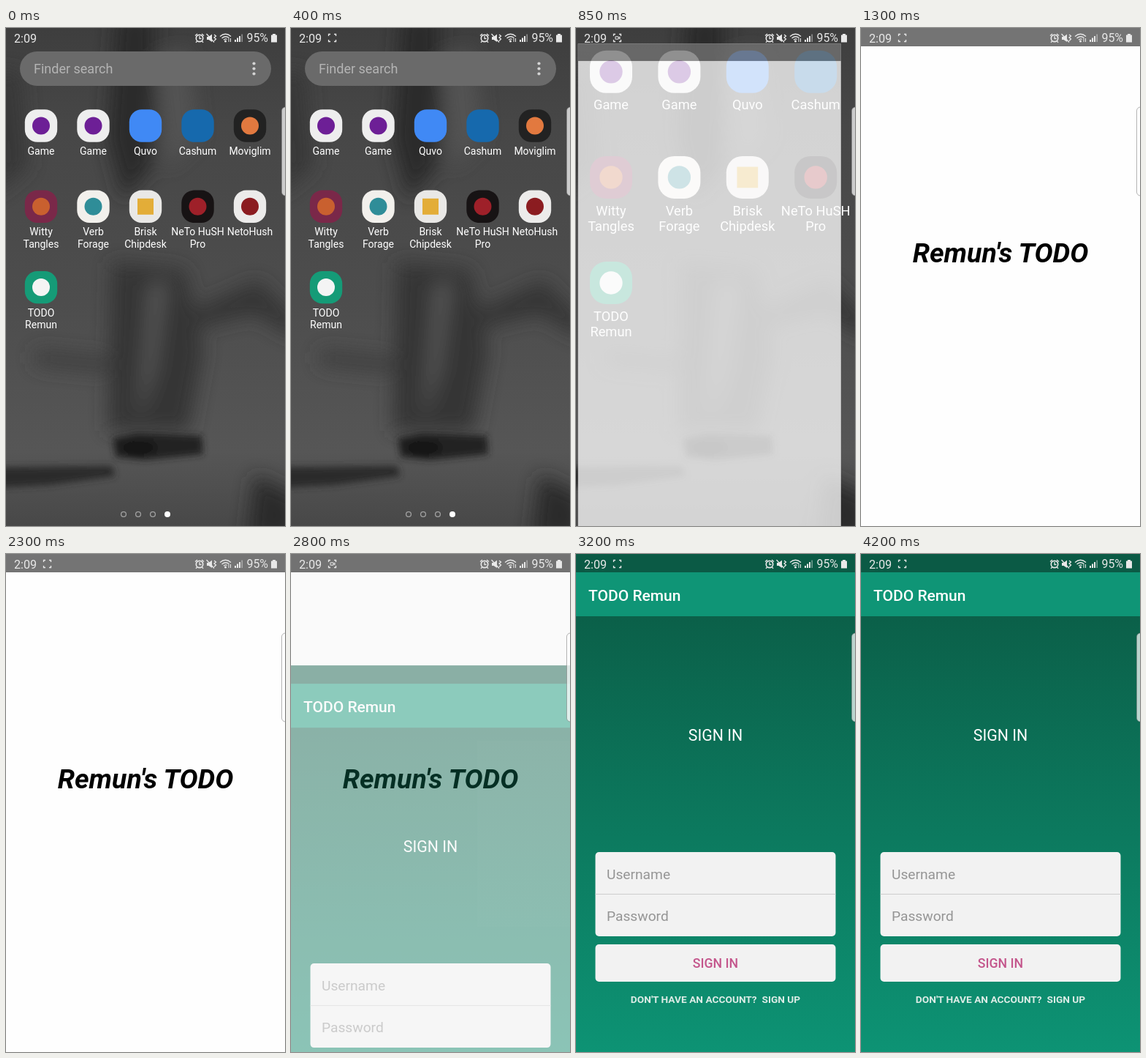
An HTML page for the animation above (4750 ms loop, 382 by 680 pixels).

```html
<!DOCTYPE html>
<html lang="en">
<head>
<meta charset="utf-8">
<title>Todo app launch</title>
<style>
  html, body { margin: 0; width: 100%; height: 100%; overflow: hidden; background: #444; }
  svg { display: block; width: 100%; height: 100%; }
  text { font-family: Roboto, "Noto Sans", sans-serif; white-space: pre; }
  .mid { text-anchor: middle; }
</style>
</head>
<body>
<svg viewBox="0 0 382 680" preserveAspectRatio="xMidYMid meet">
  <defs>
    <linearGradient id="wall" x1="0" y1="0" x2="0" y2="1">
      <stop offset="0" stop-color="#3e3e3e"/>
      <stop offset=".2" stop-color="#474747"/>
      <stop offset=".55" stop-color="#4d4d4d"/>
      <stop offset=".85" stop-color="#565656"/>
      <stop offset="1" stop-color="#484848"/>
    </linearGradient>
    <linearGradient id="green" x1="0" y1="0" x2="0" y2="1">
      <stop offset="0" stop-color="#0b6049"/>
      <stop offset="1" stop-color="#0d9374"/>
    </linearGradient>
    <filter id="soft" x="-30%" y="-30%" width="160%" height="160%"><feGaussianBlur stdDeviation="13"/></filter>
    <filter id="blur" x="-30%" y="-60%" width="160%" height="220%"><feGaussianBlur stdDeviation="5"/></filter>
  </defs>

  <g id="wallpaper">
    <rect width="382" height="680" fill="url(#wall)"/>
    <g filter="url(#soft)">
      <path d="M150-20H205L200 190L160 235L138 150Z" fill="#2c2c2c"/>
      <path d="M-20 60H20L30 190L-20 230Z" fill="#383838"/>
      <path d="M205 40L250 30L262 150L220 190Z" fill="#535353"/>
      <path d="M145 320L245 330L270 440L250 550H140Z" fill="#343434"/>
      <path d="M195 350L222 345L205 470L180 540Z" fill="#535353"/>
      <path d="M255 385L345 345L400 400V425L340 390L260 410Z" fill="#353535"/>
      <path d="M40 440L140 450V470L40 460Z" fill="#3c3c3c"/>
      <path d="M340 610L400 640V700H330Z" fill="#2a2a2a"/>
    </g>
    <g filter="url(#blur)">
      <path d="M146 560L180 553L268 557L270 582L190 590L150 586Z" fill="#242424"/>
      <path d="M-15 600L145 598L150 612L60 624L-15 628Z" fill="#2b2b2b"/>
      <ellipse cx="181" cy="573" rx="25" ry="12" fill="#191919"/>
    </g>
  </g>

  <g id="home">
    <rect x="19" y="32" width="344" height="47" rx="23.5" fill="#6a6a6a"/>
    <text x="38" y="62" font-size="18" fill="#b4b4b4">Finder search</text>
    <g fill="#d4d4d4">
      <circle cx="339.5" cy="48.5" r="2.1"/>
      <circle cx="339.5" cy="55.5" r="2.1"/>
      <circle cx="339.5" cy="62.5" r="2.1"/>
    </g>
    <g id="apps"></g>
    <g fill="none" stroke="#a2a2a2" stroke-width="1.3">
      <circle cx="161" cy="664" r="3.4"/>
      <circle cx="181" cy="664" r="3.4"/>
      <circle cx="201" cy="664" r="3.4"/>
      <circle cx="221" cy="664" r="4" fill="#fff" stroke="none"/>
    </g>
  </g>

  <g id="splash">
    <rect width="382" height="700" fill="#fefefe"/>
    <rect width="382" height="25" fill="#747474"/>
    <text id="heading" class="mid" x="191" y="320" font-size="37.5" font-weight="700" font-style="italic">Remun's TODO</text>
  </g>
  <rect id="dim" width="382" height="680"/>

  <g id="login">
    <rect y="84" width="382" height="596" fill="url(#green)"/>
    <rect width="382" height="26" fill="#0b5a45"/>
    <rect y="25" width="382" height="60" fill="#0f9576"/>
    <text x="17" y="63.5" font-size="21" font-weight="500" fill="#fff">TODO Remun</text>
    <text class="mid" x="191" y="254.5" font-size="21.3" fill="#fff">SIGN IN</text>
    <rect x="26.5" y="407" width="329" height="115" rx="5" fill="#f2f2f2"/>
    <path d="M26.5 464.5H355.5" stroke="#cdcdcd"/>
    <g font-size="19.2" fill="#959595">
      <text x="42" y="443.5">Username</text>
      <text x="42" y="501">Password</text>
    </g>
    <rect x="26.5" y="533" width="329" height="51" rx="5" fill="#f2f2f2"/>
    <text class="mid" x="191" y="565" font-size="17.7" font-weight="500" fill="#c4568c">SIGN IN</text>
    <text class="mid" x="191" y="612.5" font-size="13.7" font-weight="700" fill="#dcece6">DON'T HAVE AN ACCOUNT?  SIGN UP</text>
  </g>

  <rect x="377.5" y="108" width="14" height="121" rx="5" fill="#fff" fill-opacity=".72" stroke="#777" stroke-opacity=".55"/>

  <g id="status" fill="#e8e8e8">
    <text x="11" y="19.5" font-size="16.2">2:09</text>
    <text x="329.5" y="19.3" font-size="15.9">95%</text>
    <g fill="none" stroke="#e8e8e8" stroke-width="1.3">
      <g id="rec">
        <path d="M51.5 11V8.5H54M59 8.5H61.5V11M61.5 16V18.5H59M54 18.5H51.5V16"/>
        <path id="cam" d="M54 11.8H58V15.2H54ZM58 13.5L60 12V15Z" stroke-width="1"/>
      </g>
      <circle cx="265" cy="14" r="4.7" stroke-width="1.7"/>
      <path d="M265 11V14.5H267.5M259 10.5L262 8M271 10.5L268 8M261.5 18L260 19.8M268.5 18L270 19.8"/>
      <path d="M274.5 8L285 19.5M285 9L287.5 11L285 13L287.5 15L285 17.5"/>
      <path d="M293 11.5Q300.5 5 308 11.5M295.5 14Q300.5 9.7 305.5 13.5M298 16.3Q300.5 14 302.5 15.5"/>
      <path d="M305 14V19M307.5 19V14" stroke-width="1"/>
    </g>
    <path d="M275 12H277.5L282 8.5V19L277.5 16H275Z"/>
    <circle cx="300.5" cy="18" r="1.5"/>
    <path d="M313 16H315V19H313ZM316 13.5H318V19H316ZM319 11H321V19H319Z"/>
    <path d="M322.3 8.5H324V19H322.3Z" opacity=".45"/>
    <path d="M363 9.5H365V8H369V9.5H371V19.5H363Z"/>
  </g>
</svg>
<script>
const LOOP = 4750, STEP = 50;
const el = id => document.getElementById(id);
const clamp = v => Math.max(0, Math.min(1, v));
const span = (t, a, b) => clamp((t - a) / (b - a));

// label, tile colour, mark colour, square mark
const apps = [
  ["Game", "#eeeeee", "#6d1f96"],
  ["Game", "#eeeeee", "#6d1f96"],
  ["Quvo", "#4089f5"],
  ["Cashum", "#1669ad"],
  ["Moviglim", "#222222", "#e2793f"],
  ["Witty\nTangles", "#7a2849", "#c9602f"],
  ["Verb\nForage", "#f2f0ec", "#2f8d98"],
  ["Brisk\nChipdesk", "#e9e8e6", "#e3ad38", true],
  ["NeTo HuSH\nPro", "#171314", "#9e2029"],
  ["NetoHush", "#ecebea", "#8b1c20"],
  ["TODO\nRemun", "#159b77", "#f4f4f4"]
];

function icon([label, tile, mark, square], i) {
  const x = 48 + (i % 5) * 71.5, y = 133.5 + Math.floor(i / 5) * 110.3;
  const shape = !mark ? "" : square
    ? `<rect x="${x - 11}" y="${y - 11}" width="22" height="22" fill="${mark}"/>`
    : `<circle cx="${x}" cy="${y}" r="12" fill="${mark}"/>`;
  const lines = label.split("\n").map((s, n) =>
    `<text class="mid" x="${x}" y="${y + 39.5 + n * 16.2}" font-size="14" fill="#fff">${s}</text>`);
  return `<rect x="${x - 22.2}" y="${y - 22.2}" width="44.4" height="44.4" rx="17" fill="${tile}"/>`
    + shape + lines.join("");
}
el("apps").innerHTML = apps.map(icon).join("");

const set = (id, attrs) => {
  for (const k in attrs) el(id).setAttribute(k, attrs[k]);
};
const show = (id, on) => set(id, { display: on ? "inline" : "none" });
const grow = s => `translate(48 374) scale(${s}) translate(-48 -374)`;

// recorder icon blink: on from a to b
const blinks = [[800, 1250], [1700, 2300], [2700, 3200], [3700, 4200]];

function draw(t) {
  // launch: launcher and new window both grow from the tapped icon
  const open = 1 - (1 - span(t, 750, 950)) ** 3;
  const covered = t >= 950;
  show("wallpaper", !covered);
  show("home", !covered);
  set("home", { transform: grow(1 + 0.35 * open) });

  const lift = -10 * span(t, 2800, 2950);
  show("splash", t > 750 && t < 3200);
  set("splash", {
    transform: covered ? `translate(0 ${lift})` : grow(0.54 + 0.46 * open),
    opacity: span(t, 750, 880)
  });
  show("heading", t >= 1150);

  // login slides up over the splash
  set("dim", { opacity: t < 3200 ? 0.14 * span(t, 2780, 2950) : 0 });
  show("login", t > 2700);
  set("login", {
    transform: `translate(0 ${352 * (1 - span(t, 2700, 3200)) ** 3.76})`,
    opacity: span(t, 2700, 2917)
  });

  show("rec", t >= 250);
  show("cam", blinks.some(([a, b]) => t >= a && t < b));
}

const start = performance.now();
function tick() {
  const t = (performance.now() - start) % LOOP;
  draw(Math.floor(t / STEP) * STEP);
  requestAnimationFrame(tick);
}
tick();
</script>
</body>
</html>
```
